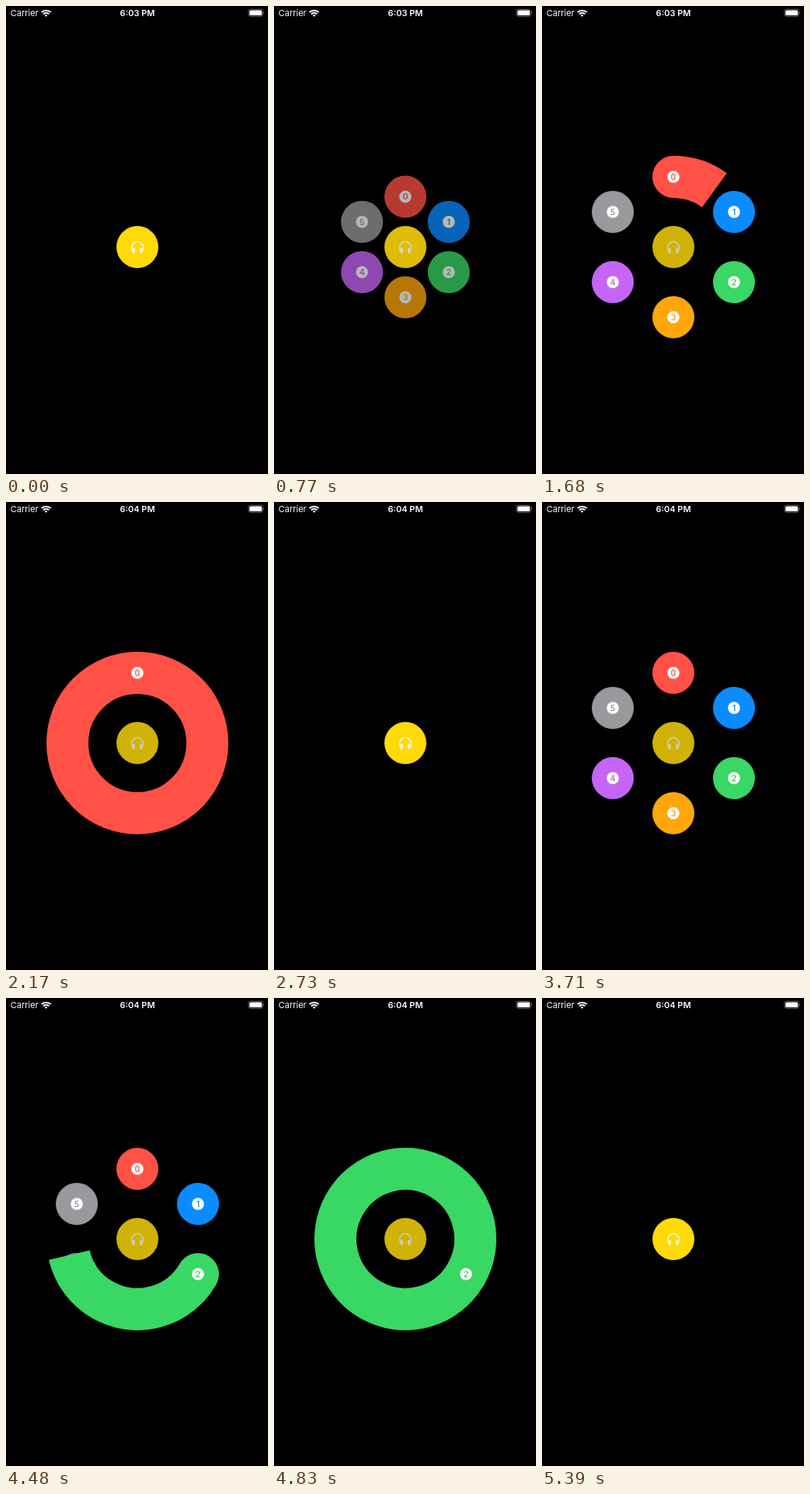
Write an HTML page that moves like this. It is 337 by 600 pixels and loops after 5.46 s.

```html
<!DOCTYPE html>
<html lang="en">
<head>
<meta charset="utf-8">
<title>Circle menu</title>
<style>
  html, body { margin: 0; width: 100%; height: 100%; overflow: hidden; background: #000; }
  svg { display: block; width: 100vw; height: 100vh; }
  text { font-family: Inter, Roboto, sans-serif; fill: #fff; }
  .digit { font-size: 10.5px; font-weight: 600; text-anchor: middle; }
</style>
</head>
<body>
<svg viewBox="0 0 337 600">
  <rect width="337" height="600"/>

  <text x="5.7" y="13" font-size="11">Carrier</text>
  <g fill="none" stroke="#fff" stroke-width="2.1">
    <path d="M45.7 8.1A8.4 8.4 0 0 1 57.5 8.1"/>
    <path d="M48 10.4A5.1 5.1 0 0 1 55.2 10.4"/>
    <path d="M51.6 13.7L49.8 11.9A2.6 2.6 0 0 1 53.4 11.9Z" fill="#fff" stroke="none"/>
  </g>
  <text id="clock" x="169" y="13" font-size="11" font-weight="600" text-anchor="middle"></text>
  <rect x="311.8" y="4.3" width="18.6" height="9" rx="2.6" fill="none" stroke="#777" stroke-width=".9"/>
  <rect x="313.2" y="5.6" width="15.9" height="6.4" rx="1.5" fill="#fff"/>
  <path d="M331.5 7.3Q332.9 8.8 331.5 10.3Z" fill="#777"/>

  <g id="menu" transform="translate(169 309)"></g>

  <g transform="translate(169 309)">
    <circle r="27"/>
    <g id="hub">
      <circle r="27" fill="#ffda08"/>
      <path d="M-7.2 4.5V0A7.2 6.8 0 0 1 7.2 0V4.5" fill="none" stroke="#fff" stroke-width="1.3" opacity=".92"/>
      <g fill="#fff" opacity=".92">
        <rect x="-6.5" y="1.2" width="3.3" height="6.5" rx="1.3"/>
        <rect x="3.2" y="1.2" width="3.3" height="6.5" rx="1.3"/>
      </g>
    </g>
  </g>
</svg>
<script>
const LOOP = 5460, STEP = 70, DISTANCE = 90, SIZE = 27;
const MOVE = 370, FILL = 500;
const CLOCK_TICK = 1890;
const COLORS = ['#ff5145', '#0b8bff', '#39d764', '#ffa60b', '#c665f5', '#98989d'];
const CYCLES = [
  { open: 530, fill: 1630, close: 2350, pick: 0 },
  { open: 3330, fill: 4290, close: 5010, pick: 2 },
];

const byId = id => document.getElementById(id);
const menu = byId('menu'), hub = byId('hub'), clock = byId('clock');

function add(parent, tag, attrs) {
  const node = document.createElementNS('http://www.w3.org/2000/svg', tag);
  setAttrs(node, attrs);
  return parent.appendChild(node);
}

function setAttrs(node, attrs) {
  for (const key in attrs) node.setAttribute(key, attrs[key]);
}

const angleOf = index => index * 60 - 90;

const buttons = COLORS.map((fill, index) => {
  const group = add(menu, 'g', {});
  add(group, 'circle', { r: SIZE, fill });
  add(group, 'circle', { r: 7.8, fill: '#fff' });
  const digit = add(group, 'text', { class: 'digit', y: 3.8, style: `fill:${fill}` });
  digit.textContent = index;
  return group;
});

const ring = add(menu, 'circle', {
  r: DISTANCE, fill: 'none', 'stroke-width': SIZE * 2, pathLength: 360,
});

const progress = (time, start, length) => Math.min(1, Math.max(0, (time - start) / length));
const ease = p => p * p * (3 - 2 * p);

let picked = null;

// The ring passes over the other buttons but under the picked one.
function pickButton(index) {
  if (index === picked) return;
  picked = index;
  menu.append(ring, buttons[index]);
  setAttrs(ring, { stroke: COLORS[index], transform: `rotate(${angleOf(index)})` });
}

function render(time) {
  const cycle = CYCLES[time < CYCLES[1].open ? 0 : 1];
  const opened = ease(progress(time, cycle.open, MOVE));
  const closed = ease(progress(time, cycle.close, MOVE));
  const sweep = 360 * progress(time, cycle.fill, FILL);
  const shown = opened * (1 - closed);

  pickButton(cycle.pick);
  buttons.forEach((button, index) => {
    const angle = angleOf(index) * Math.PI / 180, reach = DISTANCE * opened;
    const x = reach * Math.cos(angle), y = reach * Math.sin(angle);
    // Once the ring is full it hides every button but the picked one.
    const covered = sweep === 360 && index !== cycle.pick;
    setAttrs(button, {
      transform: `translate(${x} ${y})`,
      visibility: covered ? 'hidden' : 'visible',
    });
  });
  setAttrs(ring, {
    'stroke-dasharray': sweep === 360 ? 'none' : `${sweep} 720`,
    visibility: sweep > 0 ? 'visible' : 'hidden',
  });
  menu.setAttribute('opacity', shown);
  hub.setAttribute('opacity', 1 - 0.18 * shown);
  clock.textContent = time < CLOCK_TICK ? '6:03 PM' : '6:04 PM';
}

const start = performance.now();

function tick() {
  const time = (performance.now() - start) % LOOP;
  render(Math.floor(time / STEP) * STEP);
  requestAnimationFrame(tick);
}
tick();
</script>
</body>
</html>
```
